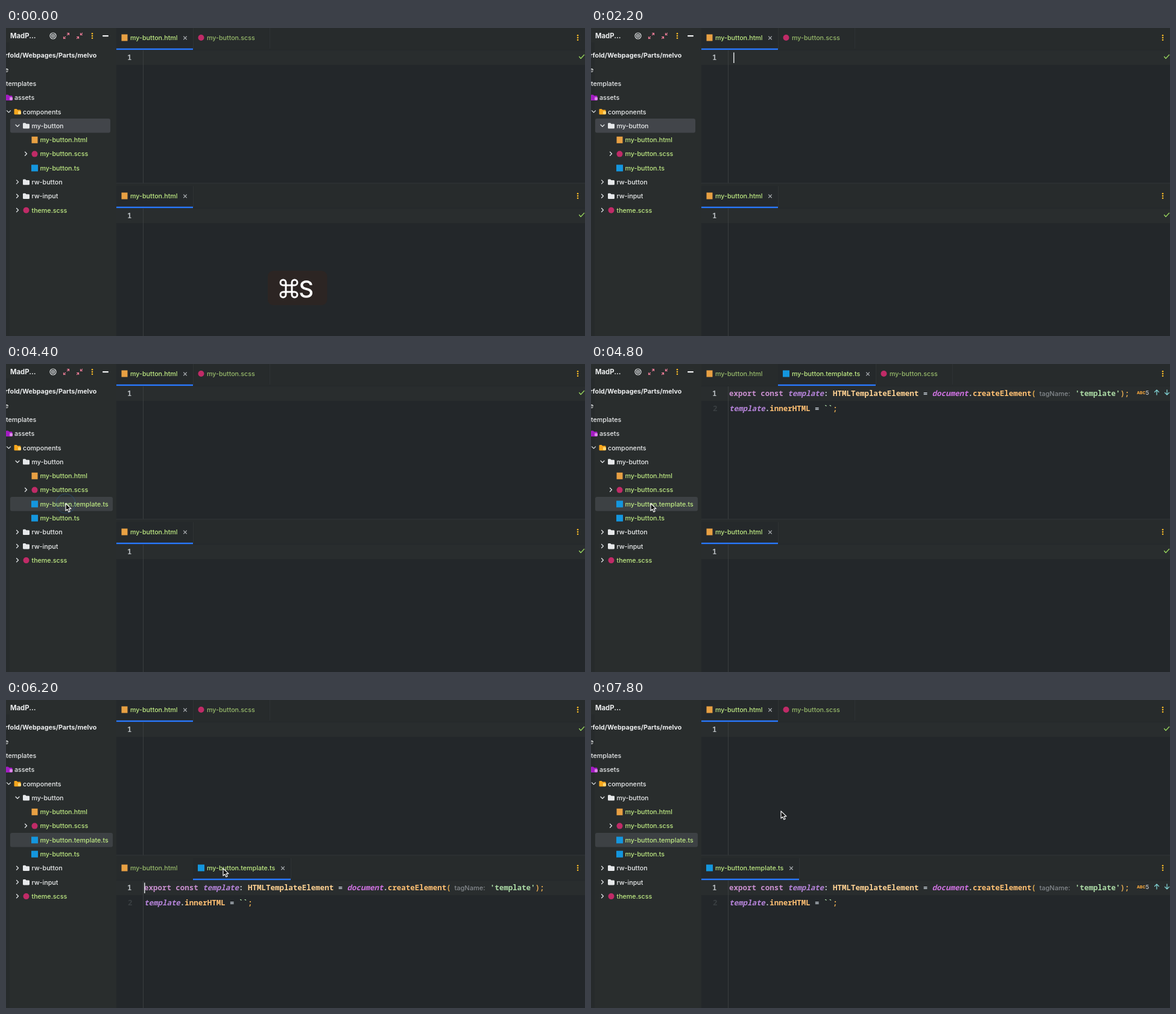
Write an HTML page that moves like this. It is 960 by 510 pixels and loops after 8000 ms.

```html
<!DOCTYPE html>
<html lang="en">
<head>
<meta charset="utf-8">
<title>Editor</title>
<style>
  html, body { margin: 0; width: 100%; height: 100%; overflow: hidden; background: #23272a; }
  svg { display: block; width: 960px; height: 510px; }
  text { font: 500 10.7px Inter, "Open Sans", sans-serif; fill: #eceeef; white-space: pre; }
  .bold { font-weight: 700; }
  .title { font-weight: 700; font-size: 11.3px; }
  .git { fill: #c0ec84; }
  .idle { fill: #98bb6b; }
  .hint { fill: #858a8e; font-size: 11px; }
  .abc { fill: #f5a63c; font-size: 6.6px; font-weight: 800; }
  .count { fill: #c4c8cb; font-size: 9.5px; }
  .key { fill: #fff; font-size: 38px; }
  .mono { font: 600 12.47px "Noto Sans Mono", "DejaVu Sans Mono", monospace; fill: #bcc4cb; }
  .word { fill: #c98fcf; }
  .var { fill: #b684da; font-style: italic; }
  .obj { fill: #cf72e2; font-style: italic; font-weight: 700; }
  .type { fill: #ffd293; }
  .call { fill: #ffc073; }
  .str { fill: #acdba6; }
  .end { fill: #e0a850; }
  .num { fill: #b0b5b8; }
  .dim { fill: #3a3f42; }
</style>
</head>
<body>
<svg id="stage" viewBox="0 0 960 510"></svg>
<script>
const LOOP = 8000, STEP = 200;
const KEYS_SHOWN = [[0, 1000], [2800, 4000]];
const FILE_ADDED = 3800, FILE_PICKED = 4400, FILE_OPENED = 4800;
const PANEL_LEFT = 5000, TAB_DROPPED = 6200, TAB_CLOSED = 7200;
const CLICKS = [[4400, 4800], [5600, 6200]];
const POINTER = [
  [4000, 150, 190], [4200, 106, 224], [4400, 99, 231], [4800, 99, 231],
  [5000, 220, 140], [5200, 380, 36], [5600, 409, 30], [6000, 385, 200],
  [6200, 360, 279], [6600, 309, 289], [6800, 297, 280], [7200, 297, 280],
  [7800, 315, 184]
];

const within = (t, spans) => spans.some(([from, to]) => t >= from && t < to);
const rect = (x, y, w, h, fill, r = 0) =>
  `<rect x="${x}" y="${y}" width="${w}" height="${h}" rx="${r}" fill="${fill}"/>`;
const dot = (x, y, r, fill) => `<circle cx="${x}" cy="${y}" r="${r}" fill="${fill}"/>`;
const line = (d, color, width = 1.3) =>
  `<path d="${d}" fill="none" stroke="${color}" stroke-width="${width}" stroke-linecap="round" stroke-linejoin="round"/>`;
const text = (x, y, s, cls = '') => `<text x="${x}" y="${y}" class="${cls}">${s}</text>`;
const kebab = (x, y) => [-3.8, 0, 3.8].map(d => dot(x, y + d, 1.3, '#fbbd27')).join('');

const folder = color => (x, y) =>
  `<path d="M${x - 5.5} ${y - 3.5}q0-1.3 1.3-1.3h2.8l1.6 1.5h4q1.3 0 1.3 1.3v5.3q0 1.3-1.3 1.3h-8.4q-1.3 0-1.3-1.3z" fill="${color}"/>`;
const icons = {
  html: (x, y) => rect(x - 5, y - 5.5, 10, 11, '#e8a043'),
  scss: (x, y) => dot(x, y, 5, '#c02b67'),
  ts: (x, y) => rect(x - 5.5, y - 5.5, 11, 11, '#1496de'),
  folder: folder('#e6e8ea'),
  assets: (x, y) => folder('#a31cc2')(x, y) + rect(x + 1, y - 1, 5, 5, '#dd8bea', 1),
  parts: (x, y) => folder('#f5a61d')(x, y) + rect(x + 1, y - 1, 5, 5, '#ffd777', 1)
};
const kindOf = name => name.split('.').pop();

function chevron(x, y, open) {
  return line(open ? `M${x - 3} ${y - 1.5}l3 3 3-3` : `M${x - 1.5} ${y - 3}l3 3-3 3`, '#dfe2e4');
}

function toolbar() {
  const pink = '#e77a94';
  return `<circle cx="78" cy="13" r="5" fill="none" stroke="#dfe2e4" stroke-width="1.2"/>` +
    `<circle cx="78" cy="13" r="2.5" fill="none" stroke="#dfe2e4" stroke-width="1.1"/>` + dot(78, 13, 1, '#dfe2e4') +
    line('M101.5 11.5l3-3m-3 0h3v3M98.5 14.5l-3 3m0-3v3h3', pink, 1.2) +
    line('M126.5 8.5l-3 3m0-3v3h3M117.5 17.5l3-3m-3 0h3v3', pink, 1.2) +
    kebab(143, 13) + rect(160, 12, 10, 2.3, '#f0f1f2', 1);
}

function sidebar(t) {
  const added = t >= FILE_ADDED, picked = t >= FILE_PICKED;
  const rowY = i => 45.5 + 23.3 * i;
  // label, text x, icon, chevron state
  const rows = [
    ['rfold/Webpages/Parts/melvo', -2],
    ['e', -2],
    ['templates', 0],
    ['assets', 14, 'assets'],
    ['components', 28, 'parts', 'open'],
    ['my-button', 42.5, 'folder', 'open'],
    ['my-button.html', 56.5, 'html'],
    ['my-button.scss', 56.5, 'scss', 'shut'],
    ...(added ? [['my-button.template.ts', 56.5, 'ts']] : []),
    ['my-button.ts', 56.5, 'ts'],
    ['rw-button', 42.5, 'folder', 'shut'],
    ['rw-input', 42.5, 'folder', 'shut'],
    ['theme.scss', 42.5, 'scss', 'shut']
  ];
  let out = rect(0, 0, 183, 510, '#292d2d') + rect(0, 24, 6, 486, '#262a2b');
  out += picked ? rect(7, 220, 170, 23.5, '#3d4144', 3) : rect(7, 150, 166, 23.5, '#42454a', 3);
  out += text(7, 17, 'MadP...', 'title');
  if (t < PANEL_LEFT) out += toolbar();
  rows.forEach(([label, x, icon, fold], i) => {
    const y = rowY(i);
    if (fold) out += chevron(x - 23.5, y - 0.3, fold === 'open');
    if (icon) out += icons[icon](x - 9, y);
    out += text(x, y + 3.8, label, label.includes('.') ? 'git' : i ? '' : 'bold');
  });
  return out;
}

function tabs(top, names, active) {
  let x = 183, out = rect(183, top, 777, 36, '#272b2c');
  for (const name of names) {
    const on = name === active, width = name.includes('template') ? 162 : 127, y = top + 16.5;
    if (on) {
      out += rect(x, top, width, 34, '#25292b') + rect(x, top + 33.8, width, 2.4, '#2979ff');
      out += line(`M${x + width - 15.5} ${y - 2.5}l5 5m0-5l-5 5`, '#a5a9ac', 1.1);
    }
    out += icons[kindOf(name)](x + 13.5, y - 0.5) + text(x + 23, y + 3.6, name, on ? 'git' : 'idle');
    x += width;
    out += rect(x, top, 1, 34, '#2e3234');
  }
  return out + kebab(948, top + 16);
}

function code(y) {
  const row = (dy, parts) => parts.map(([col, s, cls]) =>
    text(229 + col * 7.48, y + dy, s, 'mono ' + cls)).join('');
  return row(4.3, [
    [0, 'export', 'word'], [7, 'const', 'word'], [13, 'template', 'var'], [21, ':', ''],
    [23, 'HTMLTemplateElement', 'type'], [43, '=', ''], [45, 'document', 'obj'], [53, '.', ''],
    [54, 'createElement', 'call'], [67, '(', 'end'],
    [76.7, "'template'", 'str'], [86.7, ');', 'end']
  ]) + text(743.5, y + 3.6, 'tagName:', 'hint') + row(29.3, [
    [0, 'template', 'var'], [8, '.', ''], [9, 'innerHTML', 'call'],
    [19, '=', ''], [21, '``', 'str'], [23, ';', 'end']
  ]) + text(202, y + 29.3, '2', 'mono dim');
}

function status(y, kind) {
  if (kind === 'ok') return line(`M950.5 ${y - 1.5}l2.5 3 5.5-6`, '#93cf5b', 1.4);
  if (kind !== 'typos') return '';
  const shaft = `${y - 6}v8`;
  return text(905, y + 0.6, 'ABC', 'abc') + text(919.5, y + 1.6, '5', 'count') +
    line(`M938 ${shaft}m-3.5-4.5l3.5-3.5 3.5 3.5`, '#7fcfd0') +
    line(`M955 ${shaft}m-3.5-3.5l3.5 3.5 3.5-3.5`, '#7fcfd0');
}

function pane(top, height, { names, active, caret, state }) {
  const y = top + 49, filled = active.includes('template');
  return rect(183, top, 777, height, '#23272a') + tabs(top, names, active) +
    rect(183, top + 37, 777, 24, '#292d2e') + rect(227, top + 37, 1, height - 37, '#3a3e40') +
    text(201, y + 4.3, '1', 'mono num') + (filled ? code(y) : '') +
    (caret ? rect(filled ? 229 : 236, y - 8.5, 1.6, 17.5, '#d5d8da') : '') + status(y, state);
}

function keycap() {
  const r = 'a4.5 4.5 0 1 1 ';
  return rect(434, 402, 98.5, 57, '#2c2523', 9) +
    line(`M464 421.5V441.5${r}-4.5-4.5H478.5${r}-4.5 4.5V421.5${r}4.5 4.5H459.5${r}4.5-4.5z`, '#fff', 3) +
    text(485.5, 445.5, 'S', 'key');
}

function pointer(t) {
  if (t < POINTER[0][0]) return '';
  const i = Math.max(1, POINTER.findIndex(p => p[0] >= t));
  const [a, b] = [POINTER[i - 1], POINTER[i]];
  const k = (t - a[0]) / (b[0] - a[0]);
  const ease = k * k * (3 - 2 * k);
  const x = a[1] + (b[1] - a[1]) * ease, y = a[2] + (b[2] - a[2]) * ease;
  let out = '';
  if (within(t, CLICKS)) {
    out += `<circle cx="${x}" cy="${y}" r="16" fill="#2465b5" fill-opacity=".08" stroke="#285f9e" stroke-width="1.5" opacity="${t < FILE_OPENED ? 0.3 : 0.9}"/>`;
  }
  if (t >= 5400 && t < 5800) {
    return out + line(`M${x - 3} ${y + 4.5}q3 0 3 2.5v8q0 2.5-3 2.5m6-13q-3 0-3 2.5m0 8q0 2.5 3 2.5`, '#e4e6e7', 1.3);
  }
  return out + `<path d="M${x} ${y}v12l2.9-2.6 2 4.5 2.2-1-2-4.3h3.9z" fill="#111" stroke="#f1f2f3" stroke-width="1.2" stroke-linejoin="round"/>`;
}

function draw(t) {
  const HTML = 'my-button.html', SCSS = 'my-button.scss', TS = 'my-button.template.ts';
  const blink = t % 1000 >= 200 && t % 1000 < 700;
  const opened = t >= FILE_OPENED && t < TAB_DROPPED, dropped = t >= TAB_DROPPED;
  const upper = {
    names: opened ? [HTML, TS, SCSS] : [HTML, SCSS],
    active: opened ? TS : HTML,
    caret: blink && t < FILE_PICKED,
    state: opened ? 'typos' : 'ok'
  };
  const lower = {
    names: !dropped ? [HTML] : t < TAB_CLOSED ? [HTML, TS] : [TS],
    active: dropped ? TS : HTML,
    caret: blink && dropped,
    state: !dropped ? 'ok' : t >= 7000 ? 'typos' : ''
  };
  return pane(0, 257, upper) + pane(262, 248, lower) +
    rect(183, 257, 777, 5, '#272b2c') + rect(183, 256.5, 777, 1, '#323638') +
    sidebar(t) + (within(t, KEYS_SHOWN) ? keycap() : '') + pointer(t);
}

const stage = document.getElementById('stage');
const start = performance.now();
let shown = -1;
function tick() {
  const t = Math.floor(((performance.now() - start) % LOOP) / STEP) * STEP;
  if (t !== shown) stage.innerHTML = draw(shown = t);
  requestAnimationFrame(tick);
}
tick();
</script>
</body>
</html>
```
